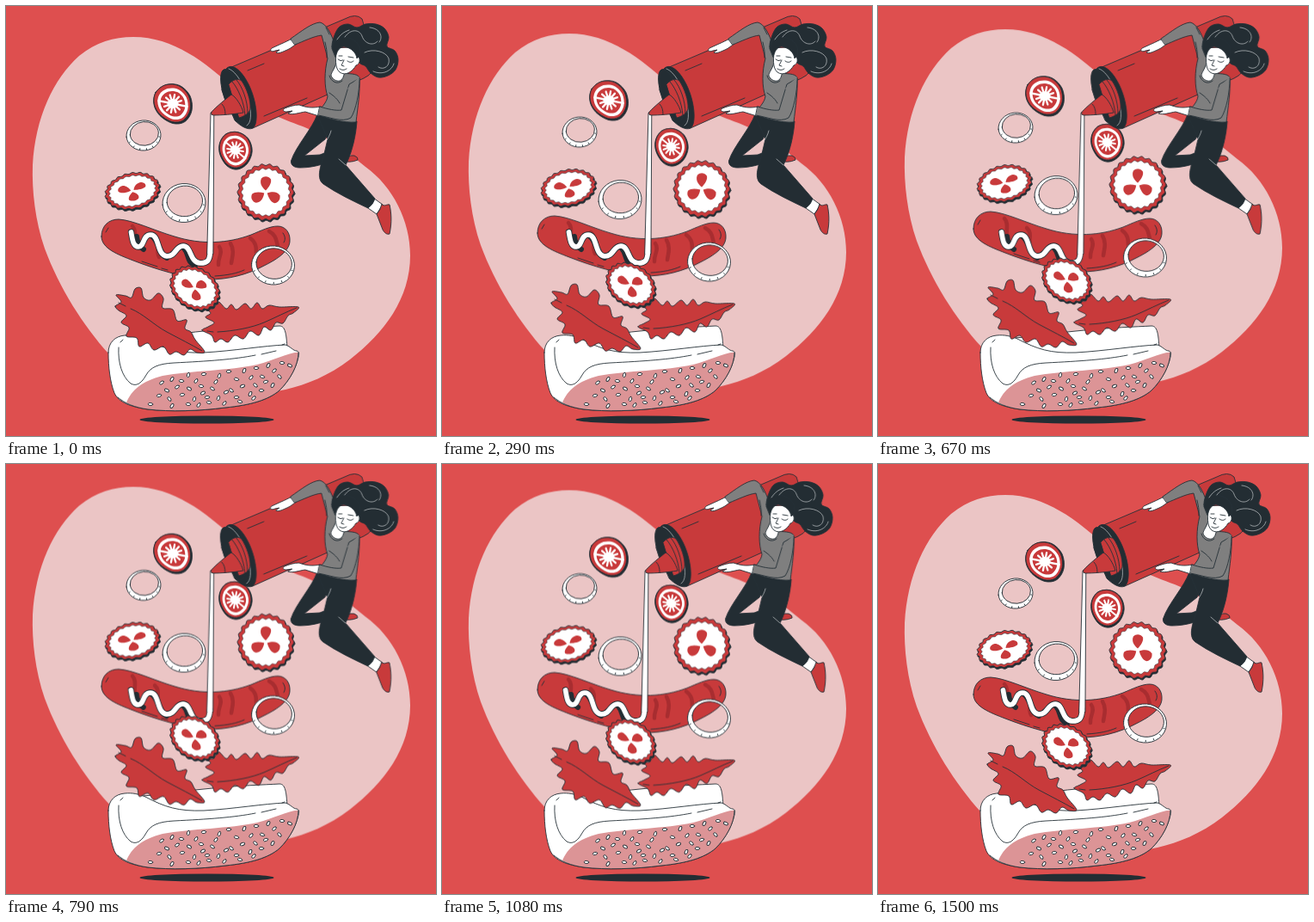
Write an HTML page that moves like this. It is 500 px wide and 500 px high and loops after 1540 ms.

```html
<!DOCTYPE html>
<html lang="en">
<head>
<meta charset="utf-8">
<title>Floating hot dog</title>
<style>
  html, body { margin: 0; width: 100%; height: 100%; overflow: hidden; background: #de4f4f; }
  svg { display: block; width: 100%; height: 100%; }
  .ink { stroke: #263238; stroke-width: .9; stroke-linejoin: round; stroke-linecap: round; }
  .line { fill: none; }
  .red { fill: #c83a3b; }
  .dark { fill: #232d33; }
  .white { fill: #fff; }
  .gray { fill: #7f7f7f; }
  .mark { fill: none; stroke: #a82d30; stroke-width: 4.5; stroke-linecap: round; }
  .pale { fill: none; stroke: #dfe3e5; stroke-width: .6; stroke-linecap: round; }
</style>
</head>
<body>
<svg viewBox="0 0 500 500">
  <rect width="500" height="500" fill="#de4f4f"/>
  <path class="float" fill="#ebc5c5" d="M148 36C195 36 232 66 262 93C295 122 318 130 345 140C375 152 400 172 418 187C450 210 470 250 470 290C470 340 440 380 400 411C375 430 350 440 325 446C270 458 190 450 120 405C90 372 62 328 45 282C34 250 30 215 31 185C34 130 55 85 85 58C105 42 125 36 148 36Z"/>
  <ellipse class="dark" cx="233.500" cy="481" rx="78" ry="4.600"/>

  <g id="bun" class="ink">
    <path class="white" d="M160 386C185 384 215 379 240 377C270 374 300 373 318 372C325 372 326 382 327 398L300 415L150 430Z"/>
    <path class="white" d="M119 403C119 391 127 384 138 383C147 382 155 384 162 387C185 399 200 404 230 403C265 401 300 395 325 394C331 396 334 401 338 401C341 402 341 404 340 408C337 422 329 436 318 447C305 458 285 464 255 467C225 471 190 472 165 469C145 466 131 461 126 450C121 437 119 420 119 403Z"/>
    <path id="crust" fill="#dc9496" stroke="none" d="M140 461C146 447 158 436 182 430C215 424 260 424 292 417C312 412 325 404 340 402.500C340 418 330 435 318 447C305 458 285 464 255 467C225 471 190 472 165 469C155 467.500 147 465 140 461Z"/>
    <path class="line" d="M340 403C340 418 330 435 318 447C305 458 285 464 255 467C225 471 190 472 165 469C150 467 138 462 130 455M131 397C130 415 135 431 145 439C152 443 158 438 163 429C168 420 177 416 195 415C235 413 265 411 290 406M297 405L314 401M133 391L136 388M321 394L324 393"/>
  </g>

  <g id="lettuce" class="float ink"></g>

  <g class="float">
    <path class="red ink" d="M111 268C111 255 120 248 131 248C148 249 172 261 196 268C228 278 258 276 285 266C297 261 307 256 316 256C325 256 331 264 330 274C329 285 316 294 302 301C280 313 258 318 235 318C206 316 174 306 148 296C130 289 111 282 111 268Z"/>
    <path class="mark" d="M147 256C153 262 148 272 150 278M173 267C181 274 173 283 178 292M248 280C253 287 246 293 247 301M261 276C266 284 263 292 262 299M284 270C291 275 291 281 291 287M306 262C314 266 314 272 316 279"/>
    <path class="ink line" d="M158 297L176 303M181 305L188 307M243 314C258 313 268 311 277 307M322 264C325 268 325 272 323 275M116 263L119 258"/>
  </g>

  <g class="shake">
    <path d="M152 268C153 277 156 281 160 283M170 268C178 274 178 289 187 293M207 282C213 288 210 298 220 302" class="line" stroke="#232d33" stroke-width="6" stroke-linecap="round"/>
    <g class="line" stroke-linecap="round" stroke-linejoin="round">
      <path id="wave" stroke="#263238" stroke-width="7.400" d="M145.500 263C147 272 148 280 154 280C161 280 159 266 168 266C179 266 175 290 187 291C198 291 197 279 206 279C216 279 213 298 226 299C234 299 237 296 237.300 286"/>
      <use href="#wave" id="cream"/>
    </g>
    <path class="white" d="M238 125L233.900 288L240.700 288L241.800 125Z"/>
    <path class="ink line" d="M238 125L233.700 288M241.800 125L241 288"/>
  </g>

  <g id="toppings" class="float ink"></g>

  <g class="shake ink">
    <path class="red" d="M260 72L394 15Q407 8 414 15L428 62Q430 78 416 84L287 142Z"/>
    <path class="line" d="M300 128L350 107M281 75L300 67"/>
    <g class="dark">
      <path d="M256 73C262 66 273 73 282 91C292 111 294 137 287 142C281 145 272 139 266 133L251 98Z"/>
      <ellipse cx="264" cy="104" rx="10.500" ry="32" transform="rotate(-19 264 104)"/>
    </g>
    <path class="pale" d="M259 73C268 76 278 94 282 110C286 126 285 136 280 139"/>
    <path class="red" d="M259 91C264 85 270 84 274 87C280 96 285 110 284 120C282 125 278 128 271 130Z"/>
    <path class="line" d="M263 88C270 96 277 112 278 127M268 86C275 94 281 110 281 125"/>
    <path class="red" d="M238.500 124C240 121 252 111 262 103C267 105 274 116 276 124C264 126 250 127 241 127Q238 127 238.500 124Z"/>
    <path class="line" d="M251 114C254 117 255 121 255 126"/>

    <path class="red" d="M392 174L405 174Q410 176 409 179Q400 183 390 180Z"/>
    <path class="dark" d="M362 126C356 143 337 163 331.500 180C331 186 336 188 342 188C354 188 366 185 374 182L395 181L396 174L378 168L365 173L347 174L371 155L385 130Z"/>
    <path class="white" d="M427 223L438 231L431 242L421 235Z"/>
    <path class="red" d="M437 230.500C440 234 443 230 446 231C448 240 449 251 446 265C443 266 440 264 438 260L431 242Q435 238 437 230.500Z"/>
    <path class="dark" d="M362 126C378 132 393 135 408 134C407 149 403 169 395 185L429 224Q427 231 421 235C404 227 385 218 369 207C361 201 365 188 369 176L374 155Z"/>
    <path class="pale" d="M371 158C375 154 377 149 378 145M395 185L387 178"/>

    <path class="white" d="M333 38C328 40 325 42 320 44L309 49C306 52 309 54 313 52L318 51L314 54C317 56 322 53 327 51C332 49 334 46 338 44Z"/>
    <path class="gray" d="M331 38C344 29 355 20 365 19C373 21 378 32 383 46L388 78C399 79 408 78 411 83C412 99 409 118 407 135C392 136 375 131 361 126C366 118 373 113 374 105C370 94 370 76 374 61L367 34C358 35 346 41 336 45Z"/>
    <path class="white" d="M384 66C382 74 378 77 378 81C380 86 386 89 390 86C393 83 393 79 394 75Z"/>
    <path class="line" d="M376 81C378 88 385 92 391 87M373 60C374 54 372 47 371 42M376 101C382 105 386 109 388 113M372 25L376 33"/>
    <path class="white" d="M366 117C356 119 349 118 341 115C335 115 329 117 324 119C321 121 323 123 326 123L333 122L328 125C334 127 341 124 348 123L364 128Z"/>
    <path class="gray" d="M365 117C374 120 384 122 390 121L399 91L411 84C411 100 407 121 401 130C391 136 376 129 363 127Z"/>
    <path stroke="none" class="gray" d="M397 96L411 82L406 108Z"/>

    <path class="dark" id="hair"/>
    <path class="white" d="M385 49C383 60 382 72 388 77C395 82 403 76 407 69C411 68 413 62 409 58C410 54 409 51 407 48Z"/>
    <path class="dark" d="M379 49C381 36 391 33 401 38C411 42 413 50 411 58L408 61C407 54 402 49 393 47C387 48 385 53 383 59Z"/>
    <path class="line" d="M386 62Q389 65 392 63M397 64Q401 67 404 64M387 58L391 58M398 59L404 60M393 63L390 69L393 70M388 73Q392 76 396 73"/>
    <path class="pale" d="M394 36C401 26 411 27 414 35C417 44 427 47 432 41M423 25C435 26 439 36 434 42M417 54C427 49 442 53 445 61C447 70 439 75 433 71M385 39C389 33 393 30 399 28M427 76C438 81 449 75 451 67"/>
  </g>
</svg>
<script>
const NS = 'http://www.w3.org/2000/svg';
const $ = id => document.getElementById(id);

function add(parent, tag, attrs) {
  const el = document.createElementNS(NS, tag);
  for (const key in attrs) el.setAttribute(key, attrs[key]);
  return parent.appendChild(el);
}

// Smooth closed curve through "x,y x,y ..." points.
function smooth(text) {
  const p = text.split(' ').map(s => s.split(',').map(Number));
  const at = i => p[(i + p.length) % p.length];
  let d = 'M' + p[0];
  p.forEach((a, i) => {
    const o = at(i - 1), b = at(i + 1), c = at(i + 2);
    const mix = k => [a[k] + (b[k] - o[k]) / 6, b[k] - (c[k] - a[k]) / 6];
    const [x1, x2] = mix(0), [y1, y2] = mix(1);
    d += `C${x1} ${y1} ${x2} ${y2} ${b}`;
  });
  return d + 'Z';
}

function seeds() {
  const spots = '212,429 230,428 248,430 259,425 277,424 291,421 305,418 321,415 193,434 204,436 221,436 227,442 244,437 268,434 285,432 298,431 312,424 330,418 181,438 187,447 199,443 213,445 229,450 240,445 256,449 262,447 275,442 290,441 302,437 318,431 178,453 190,457 205,452 219,457 234,455 247,456 268,455 284,451 297,447 310,441 168,463 193,465 212,463 224,464 236,461 254,462 272,460 288,456';
  spots.split(' ').forEach((s, i) => {
    const turn = (i * 67) % 130 - 75;
    add($('bun'), 'ellipse', { rx: 2.7, ry: 1.6, class: 'white', transform: `translate(${s}) rotate(${turn})` });
  });
}

function leaf(points, vein) {
  add($('lettuce'), 'path', { class: 'red', d: smooth(points) });
  add($('lettuce'), 'path', { class: 'line', d: vein });
}

const topping = place => add($('toppings'), 'g', { transform: place });

function onion(x, y, rx, ry, turn) {
  const g = topping(`translate(${x} ${y}) rotate(${turn})`);
  const ring = (a, b, cx, cy) => `M${cx - a} ${cy}a${a} ${b} 0 1 0 ${2 * a} 0a${a} ${b} 0 1 0 ${-2 * a} 0Z`;
  const ix = rx * .83, iy = ry * .79;
  add(g, 'path', { class: 'white', 'fill-rule': 'evenodd', d: ring(rx, ry, 0, 0) + ring(ix, iy, 1, -2) });
  let ticks = '';
  for (let a = .2; a < 3.1; a += .42) {
    const c = Math.cos(a), s = Math.sin(a);
    ticks += `M${rx * .94 * c} ${ry * .94 * s}L${rx * .9 * c} ${ry * .88 * s}`;
  }
  add(g, 'path', { class: 'line', d: ticks });
}

function pickle(x, y, rx, ry, turn, spin) {
  const edge = (a, b) => {
    let d = '';
    for (let i = 0; i <= 176; i++) {
      const t = i / 88 * Math.PI, k = 1 + .032 * Math.cos(t * 22);
      d += `${i ? 'L' : 'M'}${(a * k * Math.cos(t)).toFixed(2)} ${(b * k * Math.sin(t)).toFixed(2)}`;
    }
    return d + 'Z';
  };
  const g = topping(`translate(${x} ${y})`);
  const tilt = `rotate(${turn})`;
  add(g, 'path', { class: 'dark', d: edge(rx, ry), transform: 'translate(.8 1.8) ' + tilt });
  add(g, 'path', { class: 'red', d: edge(rx, ry), transform: tilt });
  add(g, 'path', { class: 'white', d: edge(rx * .86, ry * .85), transform: tilt, 'stroke-width': .5 });
  for (let i = 0; i < 3; i++) {
    add(g, 'path', {
      class: 'red', stroke: 'none', style: 'stroke:none',
      d: 'M0 -2C-6 -7 -7 -12 -5 -16C-2 -19 3 -19 6 -15C7 -11 4 -6 0 -2Z',
      transform: `${tilt} scale(${rx / 32} ${ry / 32}) rotate(${spin + i * 120})`
    });
  }
}

function tomato(x, y, size, turn) {
  const d = smooth('-20,-13 -8,-22 8,-21 20,-9 22,8 14,21 0,23 -15,14 -22,1');
  const g = topping(`translate(${x} ${y}) rotate(${turn}) scale(${size})`);
  const layer = (k, cls, more) => add(g, 'path', { class: cls, d, transform: `scale(${k})`, ...more });
  layer(1, 'dark');
  layer(.94, 'red', { transform: 'translate(-.8 -.8) scale(.95)' });
  layer(.79, 'white', { style: 'stroke:none' });
  layer(.64, 'red', { style: 'stroke:none' });
  let rays = '';
  for (let i = 0; i < 12; i++) {
    const a = i * Math.PI / 6 + .2, r = i % 6 ? 10.5 : 17;
    rays += `M0 0L${r * Math.cos(a)} ${r * Math.sin(a)}`;
  }
  add(g, 'path', { d: rays, style: 'stroke:#fff;stroke-width:2.3' });
  add(g, 'ellipse', { rx: 6.5, ry: 5.5, class: 'white', style: 'stroke:none' });
}

seeds();
leaf('127,349 134,344 128,336 139,337 146,339 150,329 157,328 160,339 168,342 177,334 183,340 182,351 194,353 199,366 210,365 208,375 215,379 220,388 231,402 222,403 214,399 207,406 198,402 190,405 183,396 172,400 165,392 155,396 152,386 140,384 143,374 134,368 140,360 131,354',
  'M145 352C160 358 172 371 187 379C202 387 216 394 228 401M131 345L139 349');
leaf('228,377 235,373 242,368 232,362 238,357 231,351 241,352 247,344 256,352 262,347 268,353 278,346 285,352 292,345 298,352 306,348 318,350 340,350 334,357 328,360 322,369 314,368 308,377 300,373 294,383 284,378 276,387 266,383 258,391 250,387 243,391 239,383',
  'M246 379C265 378 286 374 300 368C314 362 325 356 338 351M234 378L241 379');

tomato(194, 113.5, 1, 0);
tomato(266.5, 167.5, .9, 28);
onion(160, 150.500, 20, 17.5, -5);
onion(207, 229, 25, 22.5, -5);
pickle(147, 215, 31.5, 20.5, -12, 60);
pickle(302, 216.5, 32, 32, 0, 0);
pickle(219.5, 328, 30, 23, 32, 25);
onion(310.5, 301.500, 25, 22.5, 5);

$('hair').setAttribute('d', smooth('379,47 382,34 388,24 398,21 408,25 418,21 430,21 440,26 445,36 443,47 452,52 456,62 453,74 444,81 433,83 424,78 418,70 411,66 405,54 392,46 384,55'));

const cream = add($('cream').parentNode, 'path', { d: $('wave').getAttribute('d'), stroke: '#fff', 'stroke-width': 5.7 });
$('cream').replaceWith(cream);

// Motion: everything edible floats, the woman and her sauce shake.
const SPAN = 1500, LOOP = 1540, LAST = 36;
const float = [0, -10, 0].map(y => ({ transform: `translate(0px, ${y}px)` }));
const shake = [0, -1, 2, -4, 4, -4, 4, -4, 2, -1, 0]
  .map(x => ({ transform: `translate(${x}px, 0px)`, easing: 'ease' }));

const anims = [];
function move(cls, frames) {
  document.querySelectorAll('.' + cls).forEach(el => {
    const anim = el.animate(frames, { duration: SPAN, fill: 'both' });
    anim.pause();
    anims.push(anim);
  });
}
move('float', float);
move('shake', shake);

let start;
function tick(now) {
  start ??= now;
  const t = (now - start) % LOOP;
  const step = Math.min(LAST, Math.floor((t + 6) * LAST / SPAN));
  for (const anim of anims) anim.currentTime = step * SPAN / LAST;
  requestAnimationFrame(tick);
}
requestAnimationFrame(tick);
</script>
</body>
</html>
```
